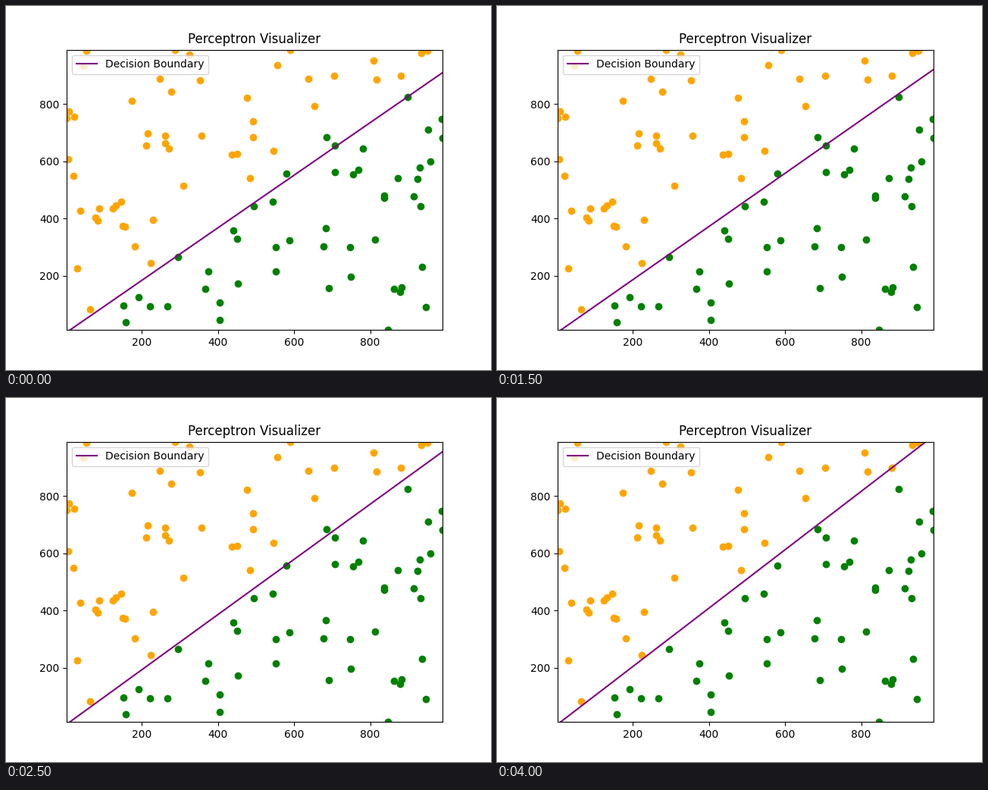
These frames come from a looping animation (640 by 480 pixels, 6.5 s). A matplotlib script:

```python
import matplotlib.pyplot as plt
import numpy as np
from matplotlib.animation import FuncAnimation

STEP_MS = 500
STEPS = 13

# x, y pairs of the two classes
ABOVE = np.array([
    2, 750, 8, 775, 22, 755, 5, 607, 19, 549, 37, 427, 78, 404, 83, 392,
    87, 436, 123, 435, 131, 445, 145, 458, 150, 374, 156, 370, 181, 303,
    224, 244, 29, 224, 63, 82, 229, 394, 309, 514, 174, 810, 215, 697,
    212, 656, 260, 689, 261, 664, 271, 644, 357, 688, 276, 843, 247, 889,
    353, 882, 287, 990, 325, 973, 54, 985, 45, 934, 477, 821, 493, 740,
    492, 683, 436, 622, 450, 625, 484, 542, 545, 636, 556, 935, 590, 988,
    638, 887, 705, 899, 653, 793, 808, 952, 816, 885, 880, 900, 935, 979,
    950, 985,
]).reshape(-1, 2)

BELOW = np.array([
    192, 124, 152, 95, 158, 37, 221, 93, 267, 93, 294, 264, 375, 215,
    366, 153, 405, 106, 404, 45, 453, 173, 441, 358, 451, 328, 494, 443,
    544, 458, 580, 558, 552, 300, 552, 215, 587, 323, 677, 302, 684, 366,
    692, 156, 749, 197, 746, 300, 685, 685, 708, 656, 708, 563, 755, 555,
    768, 569, 780, 645, 812, 325, 837, 479, 837, 472, 873, 541, 898, 824,
    914, 477, 924, 537, 931, 578, 958, 598, 933, 443, 953, 711, 989, 748,
    990, 682, 937, 231, 947, 89, 883, 160, 879, 143, 863, 153, 847, 10,
]).reshape(-1, 2)

# Boundary slope after each training pass; the last one has converged
SLOPES = [0.9188, 0.87, 1.0875, 0.93, 1.085, 0.9645, 0.885, 1.055, 1.0205]

fig, ax = plt.subplots(figsize=(6.4, 4.8), dpi=100)
ax.scatter(*ABOVE.T, color="orange")
ax.scatter(*BELOW.T, color="green")
ax.set_xlim(2, 990)
ax.set_ylim(10, 990)
ax.set_title("Perceptron Visualizer")

xs = np.array([0, 1000])
boundary, = ax.plot(xs, SLOPES[0] * xs, color="purple",
                    label="Decision Boundary", scalex=False, scaley=False)
ax.legend(loc="upper left")


def update(step):
    slope = SLOPES[min(step, len(SLOPES) - 1)]
    boundary.set_ydata(slope * xs)
    return boundary,


anim = FuncAnimation(fig, update, frames=STEPS, interval=STEP_MS,
                     repeat=True, repeat_delay=0)
plt.show()
```
